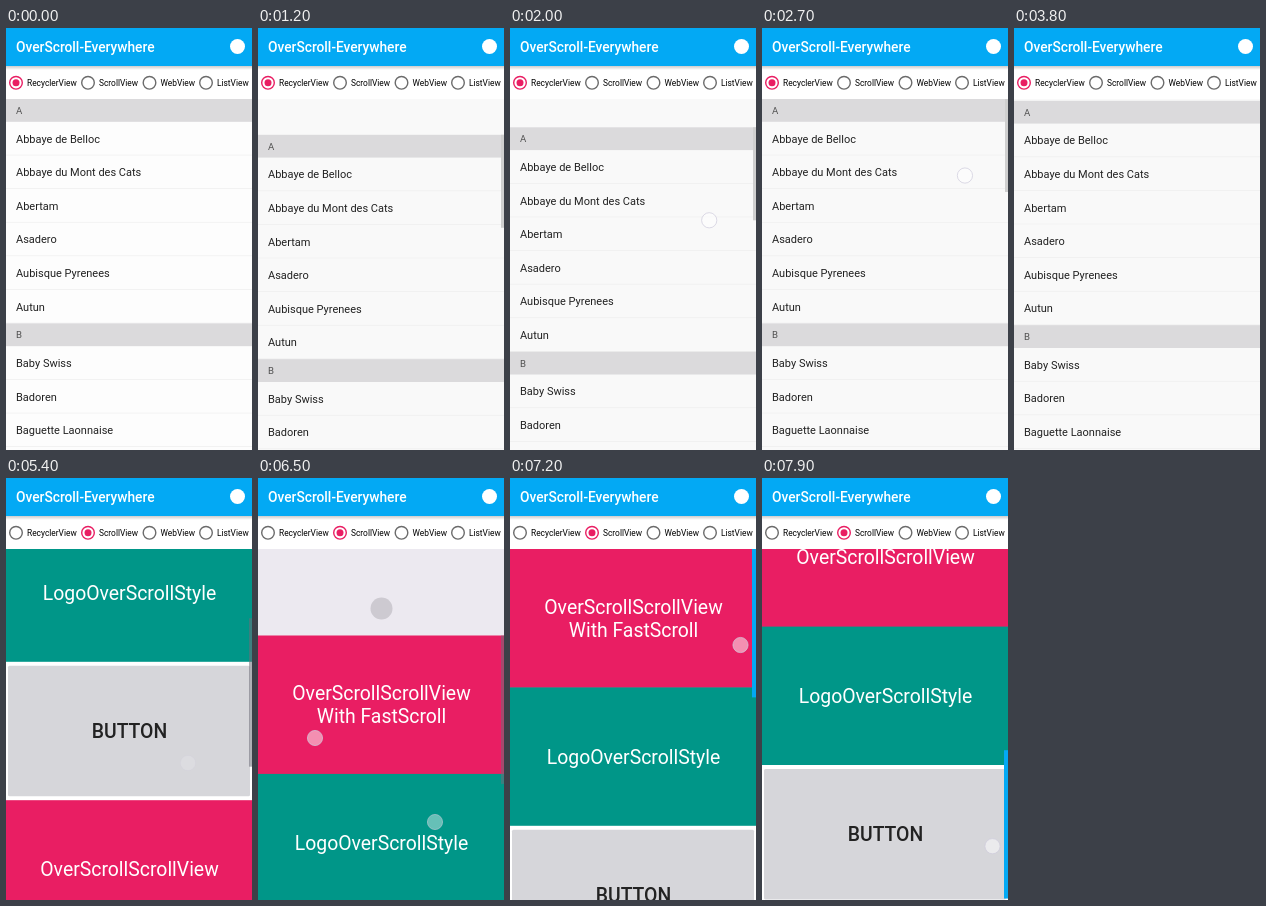
These frames come from a looping animation (246x422 px, 8000 ms). An HTML page with a canvas:

```html
<!DOCTYPE html>
<html lang="en">
<head>
<meta charset="utf-8">
<title>OverScroll-Everywhere</title>
<style>
  html, body { margin: 0; width: 100%; height: 100%; overflow: hidden; background: #fff; }
  canvas { display: block; width: 246px; height: 422px; }
</style>
</head>
<body>
<canvas id="stage"></canvas>
<script>
const W = 246, H = 422, TOP = 71, VIEW = H - TOP, LOOP = 8000;
const BLUE = '#03a9f4', PINK = '#e91e63', TEAL = '#009688';
const canvas = document.getElementById('stage');
const ctx = canvas.getContext('2d');
const ratio = window.devicePixelRatio || 1;
canvas.width = W * ratio;
canvas.height = H * ratio;

const clamp01 = v => Math.max(0, Math.min(1, v));
const ease = p => p * p * (3 - 2 * p);

// Eased interpolation through [time, value] pairs.
function track(keys, t) {
  if (t <= keys[0][0]) return keys[0][1];
  for (let i = 1; i < keys.length; i++) {
    const [t0, v0] = keys[i - 1], [t1, v1] = keys[i];
    if (t <= t1) return v0 + (v1 - v0) * ease((t - t0) / (t1 - t0));
  }
  return keys[keys.length - 1][1];
}

function rect(x, y, w, h, color) {
  ctx.fillStyle = color;
  ctx.fillRect(x, y, w, h);
}

function disc(x, y, r, fill, stroke, width = 1) {
  ctx.beginPath();
  ctx.arc(x, y, r, 0, Math.PI * 2);
  if (fill) { ctx.fillStyle = fill; ctx.fill(); }
  if (stroke) { ctx.strokeStyle = stroke; ctx.lineWidth = width; ctx.stroke(); }
}

function text(str, x, y, size, color, weight = 400, align = 'left') {
  ctx.font = `${weight} ${size}px Roboto, sans-serif`;
  ctx.textAlign = align;
  ctx.fillStyle = color;
  ctx.fillText(str, x, y);
}

function touch(x, y, alpha = 1) {
  ctx.globalAlpha = alpha;
  disc(x, y, 7.6, 'rgba(255,255,255,.5)', 'rgba(205,203,220,.7)');
  ctx.globalAlpha = 1;
}

// List page: each pull drags the list down, then it springs back.
const PULLS = [[600, 72], [1770, 60], [2680, 72]];
const DRAG = 480, SPRING = 173;
const ROWS = ['#A', 'Abbaye de Belloc', 'Abbaye du Mont des Cats', 'Abertam', 'Asadero',
  'Aubisque Pyrenees', 'Autun', '#B', 'Baby Swiss', 'Badoren', 'Baguette Laonnaise'];

function drawList(t) {
  const pull = PULLS.filter(p => t >= p[0]).pop();
  const age = pull ? t - pull[0] : 0;
  let offset = 0;
  if (pull) {
    offset = age < DRAG ? pull[1] * ease(age / DRAG) : pull[1] * Math.exp((DRAG - age) / SPRING);
    if (offset < 0.5) offset = 0;
  }
  rect(0, TOP, W, VIEW, pull ? '#f9f9f9' : '#fdfdfd');
  let y = TOP + offset;
  for (const row of ROWS) {
    const section = row[0] === '#', h = section ? 22.8 : 33.6;
    if (section) {
      rect(0, y, W, h, '#dbdadc');
      text(row[1], 10, y + 15, 9.6, '#505050');
    } else {
      rect(0, y + h - 0.7, W, 0.7, '#eeeeee');
      text(row, 10, y + h / 2 + 4, 11, '#222');
    }
    y += h;
  }
  if (!pull) return;
  ctx.globalAlpha = clamp01((1000 - age) / 200);
  rect(243, TOP + offset, 3, 93, '#cfcfcf');
  ctx.globalAlpha = 1;
  if (age < DRAG) {
    const p = ease(age / DRAG);
    touch(203 - 8 * p, 147 + 96 * p);
  }
}

// Scroll page: coloured panels of equal height.
const PANEL = 138.4;
const PANELS = [
  [PINK, 'OverScrollScrollView', 'With FastScroll'], [TEAL, 'LogoOverScrollStyle'], ['', 'BUTTON'],
  [PINK, 'OverScrollScrollView'], [TEAL, 'LogoOverScrollStyle'], ['', 'BUTTON']];
const CONTENT = PANEL * PANELS.length;
const SCROLL = [[4700, 0], [5080, 120], [5400, 164], [5700, 180], [6150, 0], [6500, -86.5],
  [6650, -92], [7050, 0], [7200, 0], [7900, 476]];

function drawPanels(t) {
  const scroll = track(SCROLL, t);
  rect(0, TOP, W, VIEW, '#ece9f0');
  const edge = TOP + Math.max(0, -scroll);
  if (scroll < 0) disc(123.5, edge - 27, 11, '#cdcad1');
  PANELS.forEach(([color, ...lines], i) => {
    const y = TOP - scroll + i * PANEL, middle = y + PANEL / 2;
    rect(0, y, W, PANEL + 0.5, color || '#fff');
    if (color) {
      lines.forEach((line, n) =>
        text(line, 123.5, middle + 7 + (n - (lines.length - 1) / 2) * 23, 19.4, '#fff', 400, 'center'));
    } else {
      ctx.beginPath();
      ctx.roundRect(2, y + 4, 242, PANEL - 8, 1.5);
      ctx.fillStyle = '#d6d6da';
      ctx.fill();
      text(lines[0], 123.5, middle + 7, 19.4, '#222', 500, 'center');
    }
  });

  const fast = t >= 7200;
  const thumb = edge + Math.max(0, scroll) * VIEW / CONTENT;
  ctx.globalAlpha = fast ? 1 : clamp01((t - 4700) / 150);
  rect(fast ? 242 : 243, thumb, 4, VIEW * VIEW / CONTENT, fast ? BLUE : 'rgba(110,110,120,.55)');
  ctx.globalAlpha = 1;

  if (t > 4700 && t < 5450) touch(182, track([[4700, 345], [5400, 285]], t), clamp01((5450 - t) / 150));
  if (t > 5750 && t < 6680) {
    touch(57, track([[5750, 130], [6500, 260]], t));
    if (t > 6050) touch(177, track([[6050, 230], [6500, 344]], t), 0.8);
  }
  if (fast) touch(230.5, thumb + 96);
}

const TABS = [[10, 'RecyclerView'], [82, 'ScrollView'], [143.5, 'WebView'], [200, 'ListView']];
const TAP = 4250, SWITCH = 4400;

function drawChrome(t) {
  rect(0, 0, W, TOP, '#fff');
  const shadow = ctx.createLinearGradient(0, 38, 0, 42);
  shadow.addColorStop(0, 'rgba(0,0,0,.2)');
  shadow.addColorStop(1, 'rgba(0,0,0,0)');
  rect(0, 38, W, 4, shadow);
  rect(0, 0, W, 38, BLUE);
  text('OverScroll-Everywhere', 10, 24, 13.75, '#fff', 500);
  disc(231.5, 18.5, 7.5, '#fff');

  const ripple = (t - TAP) / 400;
  if (ripple > 0 && ripple < 1) {
    disc(82, 55, 13.5 * Math.sqrt(ripple), `rgba(233,30,99,${0.25 * (1 - ripple)})`);
  }
  const selected = t < SWITCH ? 0 : 1;
  TABS.forEach(([x, label], i) => {
    const on = i === selected;
    disc(x, 54.8, 6.3, null, on ? PINK : '#6b6b6b', 1.4);
    if (on) disc(x, 54.8, 3.5, PINK);
    text(label, x + 11, 58, 8.4, '#000');
  });
}

function frame(now) {
  const t = now % LOOP;
  ctx.setTransform(ratio, 0, 0, ratio, 0, 0);
  (t < SWITCH ? drawList : drawPanels)(t);
  drawChrome(t);
  requestAnimationFrame(() => frame(performance.now() - start));
}

const start = performance.now();
frame(0);
</script>
</body>
</html>
```
